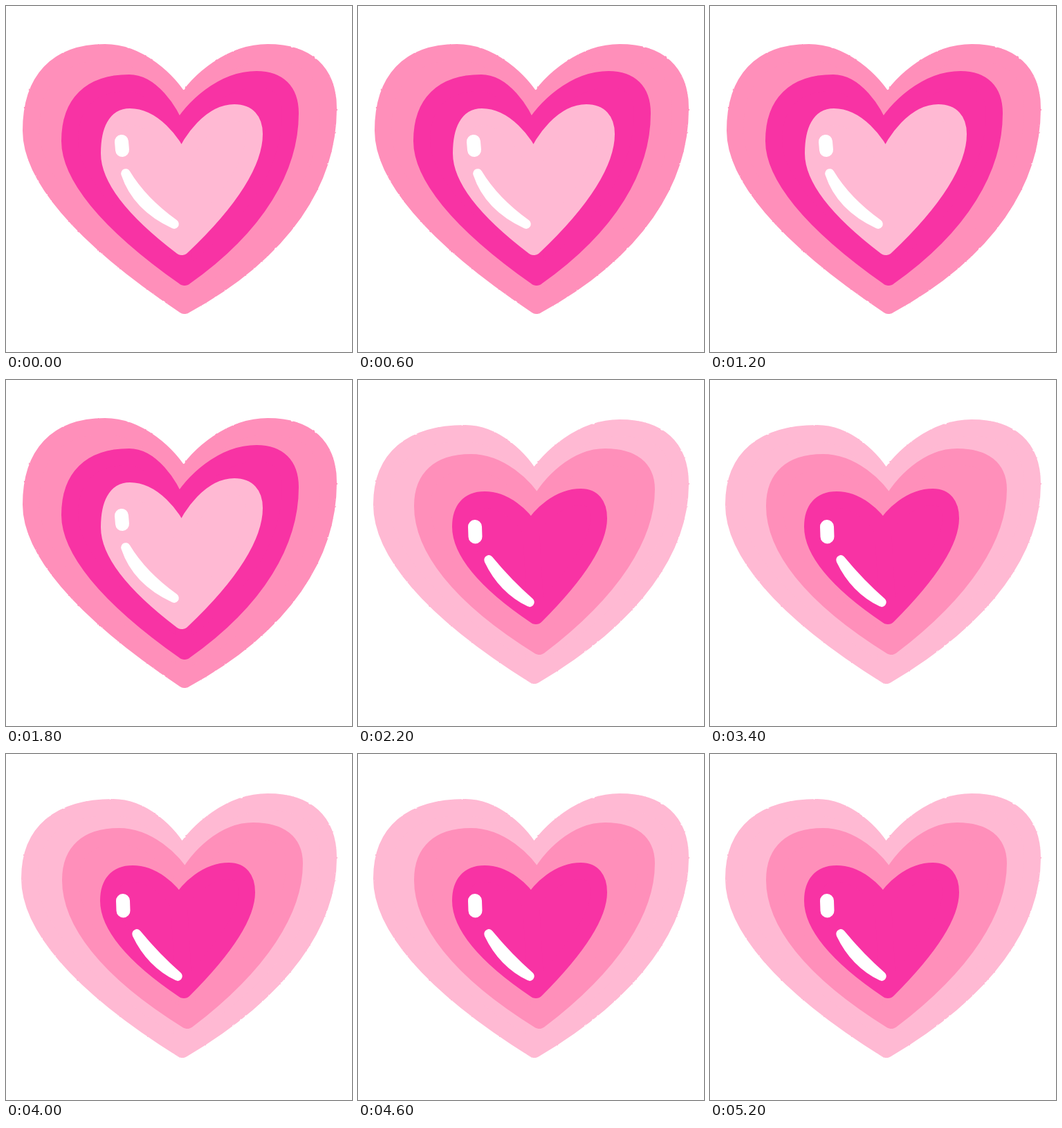
Recreate the animation shown at these times as an HTML page. Size 500x500 px, loop 5.41 s.

```html
<!DOCTYPE html>
<html lang="en">
<head>
<meta charset="utf-8">
<title>Pulsing heart</title>
<style>
  html, body { margin: 0; width: 100%; height: 100%; overflow: hidden; background: #fff; }
  svg { display: block; width: 100vw; height: 100vh; }
  path { stroke-linejoin: round; stroke-linecap: round; }
</style>
</head>
<body>
<svg id="stage" viewBox="0 0 500 500">
  <filter id="rough" filterUnits="userSpaceOnUse" x="0" y="0" width="500" height="500" color-interpolation-filters="sRGB">
    <feTurbulence type="fractalNoise" baseFrequency="0.16" numOctaves="2" seed="4"/>
    <feDisplacementMap in="SourceGraphic" scale="2" xChannelSelector="R" yChannelSelector="G"/>
  </filter>
</svg>
<script>
const MID = '#ff8fba', HOT = '#f833a4', LIGHT = '#ffb9d3', WHITE = '#fff';
const STEP = 200, LOOP = 5410, LAST = 26;
const ROUND = 12; // radius of the tip, drawn as a round-joined stroke
const stage = document.getElementById('stage');

// A lobe is its top, its outermost side and the height where the flank turns.
const wide = {
  hearts: [
    { notch: [256, 124], tip: [258, 445], left: [143, 55, 24, 180, 285], right: [378, 55, 478, 148, 319] },
    { notch: [249, 164], tip: [258, 404], left: [178, 99, 80, 195, 275], right: [362, 94, 423, 155, 284] },
    { notch: [254, 207], tip: [254, 360], left: [179, 148, 137, 213, 268], right: [330, 142, 371, 185, 249] }
  ],
  dot: [167, 196, 168, 208],
  streak: [173, 242, 193, 286, 243, 315]
};
const small = {
  hearts: [
    { notch: [254, 128], tip: [255, 439], left: [155, 65, 22, 180, 289], right: [378, 57, 478, 150, 302] },
    { notch: [259, 164], tip: [262, 397], left: [163, 107, 81, 182, 280], right: [357, 99, 429, 158, 267] },
    { notch: [250, 198], tip: [257, 353], left: [183, 161, 136, 212, 268], right: [322, 157, 360, 200, 250] }
  ],
  dot: [169, 212, 169.5, 226.5],
  streak: [189, 260, 213, 298, 248, 321]
};

// Halfway between two values of the same structure.
function mix(a, b) {
  if (typeof a === 'number') return (a + b) / 2;
  if (Array.isArray(a)) return a.map((v, i) => mix(v, b[i]));
  return Object.fromEntries(Object.keys(a).map(k => [k, mix(a[k], b[k])]));
}

const lerp = (a, b, t) => a + (b - a) * t;

// Half a heart from notch to tip, inset by the stroke radius.
function lobe([nx, ny], [tx, ty], [topX, topY, sideX, sideY, hip], dir) {
  const x = sideX - dir * ROUND, y = topY + ROUND;
  const n = ny + ROUND * 1.6, t = ty - ROUND;
  return `M${nx} ${n}` +
    `C${lerp(nx, topX, .18)} ${lerp(n, y, .48)} ${lerp(topX, nx, .43)} ${y} ${topX} ${y}` +
    `C${lerp(topX, x, .65)} ${y} ${x} ${lerp(sideY, y, .65)} ${x} ${sideY}` +
    `C${x} ${lerp(sideY, hip, .6)} ${lerp(tx, x, .7)} ${lerp(t, hip, .7)} ${tx} ${t}Z`;
}

const heart = h => lobe(h.notch, h.tip, h.left, -1) + lobe(h.notch, h.tip, h.right, 1);

// A curved stroke that swells in the middle.
function swell([ax, ay, cx, cy, bx, by]) {
  const s = 4;
  return `M${ax} ${ay}Q${cx + s} ${cy - s} ${bx} ${by}Q${cx - s} ${cy + s} ${ax} ${ay}Z`;
}

function add(parent, tag, attrs) {
  const el = document.createElementNS('http://www.w3.org/2000/svg', tag);
  for (const key in attrs) el.setAttribute(key, attrs[key]);
  return parent.appendChild(el);
}

function paint(parent, d, color, width) {
  return add(parent, 'path', { d, fill: color, stroke: color, 'stroke-width': width });
}

function pose({ hearts, dot, streak }, colors) {
  const g = add(stage, 'g', { visibility: 'hidden' });
  hearts.forEach((h, i) => {
    const el = paint(g, heart(h), colors[i], ROUND * 2);
    if (i === 0) el.setAttribute('filter', 'url(#rough)');
  });
  paint(g, `M${dot.slice(0, 2)}L${dot.slice(2)}`, WHITE, 20);
  paint(g, swell(streak), WHITE, 13.5);
  return g;
}

// The colours travel outwards from one pose to the next.
const poses = [
  pose(wide, [MID, HOT, LIGHT]),
  pose(mix(wide, small), [HOT, LIGHT, MID]),
  pose(small, [LIGHT, MID, HOT])
];

const start = performance.now();
function draw() {
  const t = (performance.now() - start) % LOOP;
  const now = Math.min(LAST, Math.floor(t / STEP)) % poses.length;
  poses.forEach((g, i) => g.setAttribute('visibility', i === now ? 'visible' : 'hidden'));
  requestAnimationFrame(draw);
}
draw();
</script>
</body>
</html>
```
